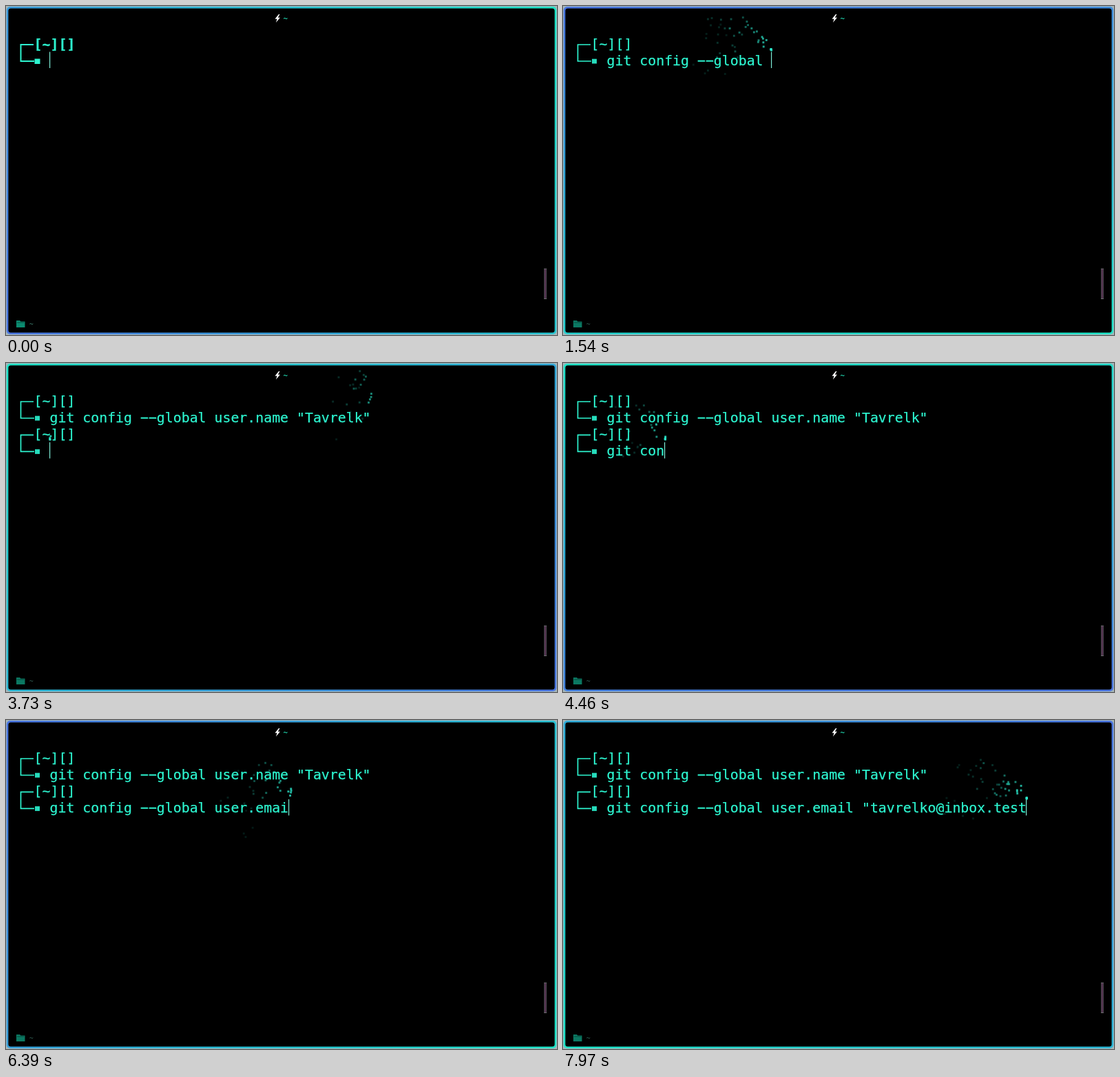
An HTML page with a canvas that plays this animation: 800x477 px, repeating every 8 s.

```html
<!DOCTYPE html>
<html lang="en">
<head>
<meta charset="utf-8">
<title>Terminal</title>
<style>
  html, body { margin: 0; width: 100%; height: 100%; overflow: hidden; background: #000; }
  canvas { display: block; width: 800px; height: 477px; }
</style>
</head>
<body>
<canvas id="stage" width="800" height="477"></canvas>
<script>
const ctx = document.getElementById("stage").getContext("2d");
const W = 800, H = 477, LOOP = 8000;
const TEAL = "#2df5d0";
const MONO = '"DejaVu Sans Mono", monospace';
const CELL = 11.95, ROW = 24.2, LEFT = 63.5, TOP = 61.5;
const SCRIPT = 'git config --global user.name "Tavrelk"\n' +
               'git config --global user.email "tavrelko@inbox.test';

// Typing rhythm: [time in ms, keys pressed]
const RHYTHM = [[150, 0], [1540, 20.4], [2280, 31], [2720, 32], [2945, 33],
                [4460, 47.3], [5660, 60.4], [7110, 79.2], [7970, 91.1], [8000, 91.4]];

// Linear interpolation along RHYTHM; from/to choose the direction.
function follow(value, from, to) {
  if (value <= RHYTHM[0][from]) return RHYTHM[0][to];
  const i = RHYTHM.findIndex(p => p[from] >= value);
  const a = RHYTHM[i - 1], b = RHYTHM[i];
  return a[to] + (b[to] - a[to]) * (value - a[from]) / (b[from] - a[from]);
}
const keysAt = time => Math.floor(follow(time, 0, 1) + 1e-6);
const timeOf = key => follow(key, 1, 0);

function random(seed) {
  const v = Math.sin(seed * 127.1 + 11.7) * 43758.5453;
  return v - Math.floor(v);
}

function rect(color, x, y, w, h) {
  ctx.fillStyle = color;
  ctx.fillRect(x, y, w, h);
}

function shape(color, points) {
  ctx.fillStyle = color;
  ctx.beginPath();
  points.forEach(([x, y]) => ctx.lineTo(x, y));
  ctx.fill();
}

function label(text, x, y, size, color, weight = "normal") {
  ctx.font = `${weight} ${size}px ${MONO}`;
  ctx.fillStyle = color;
  ctx.fillText(text, x, y);
}

// Terminal text sits on a fixed cell grid; hyphens are as wide as a minus sign.
function cells(text, x, y, weight) {
  ctx.strokeStyle = TEAL;
  ctx.lineWidth = 0.25;
  [...text.replaceAll("-", "\u2212")].forEach((c, i) => {
    label(c, x + i * CELL, y, 19.85, TEAL, weight);
    ctx.strokeText(c, x + i * CELL, y);
  });
}

function cursorAfter(key) {
  const lines = SCRIPT.slice(0, key).split("\n");
  const row = lines.length - 1;
  return { x: LEFT + lines[row].length * CELL, y: 66.5 + row * 2 * ROW };
}

function drawBorder(time) {
  const angle = (157 + time * 360 / 5600) * Math.PI / 180;
  // Direction is measured in the unit box, so the gradient follows the window's shape.
  const c = Math.cos(angle), s = Math.sin(angle);
  const reach = (Math.abs(c) + Math.abs(s)) / 2;
  const k = reach / ((c / W) ** 2 + (s / H) ** 2);
  const dx = k * c / W, dy = k * s / H;
  const paint = ctx.createLinearGradient(W / 2 + dx, H / 2 + dy, W / 2 - dx, H / 2 - dy);
  paint.addColorStop(0, "#4a74e2");
  paint.addColorStop(0.5, "#2cb2d8");
  paint.addColorStop(1, "#1ee6c8");

  rect("#a4b6ba", 0, 0, W, H);
  ctx.fillStyle = paint;
  ctx.beginPath();
  ctx.roundRect(0.9, 1, W - 1.8, H - 2, 5);
  ctx.fill();
  ctx.fillStyle = "#000";
  ctx.beginPath();
  ctx.roundRect(3.4, 3.5, W - 6.8, H - 7, 3.5);
  ctx.fill();
}

function drawPrompt(row, fresh) {
  const y = 56 + row * ROW;
  ctx.strokeStyle = TEAL;
  ctx.lineWidth = fresh ? 2 : 1.7;
  ctx.beginPath();
  ctx.moveTo(40, y);
  ctx.lineTo(21.5, y);
  ctx.lineTo(21.5, y + 24);
  ctx.lineTo(41, y + 24);
  ctx.stroke();
  if (fresh) rect(TEAL, 41.5, y + 20.5, 8, 7.5);
  else rect("#26dcbc", 42, y + 20.7, 7, 6.8);
  cells("[~][]", LEFT - 2 * CELL + 1, TOP + 0.5 + row * ROW, fresh ? "bold" : "normal");
}

function drawTerminal(keys) {
  SCRIPT.slice(0, keys).split("\n").forEach((line, i) => {
    drawPrompt(i * 2, keys === 0);
    cells(line, LEFT, TOP + (i * 2 + 1) * ROW);
  });
  const cursor = cursorAfter(keys);
  rect("#7decd5", Math.floor(cursor.x), cursor.y, 1.2, 23.5);
}

function drawSparks(time, keys) {
  for (let key = Math.max(1, keys - 14); key <= keys; key++) {
    const steps = (time - timeOf(key)) * 0.09;
    const alpha = 0.96 ** steps;
    if (alpha < 0.1) continue;
    const origin = cursorAfter(key);
    const count = 4 + Math.floor(random(key) * 3);
    ctx.globalAlpha = alpha;
    for (let i = 0; i < count; i++) {
      const seed = key * 17 + i * 2.3;
      const vx = random(seed) * 1.2 - 0.6;
      const vy = -1 - random(seed + 0.7) * 2;
      rect("#2ce8cc", origin.x + vx * steps - 1,
           origin.y + vy * steps + 0.0375 * steps * steps - 1.5, 2.9, 2.9);
    }
  }
  ctx.globalAlpha = 1;
}

function drawChrome(fresh) {
  shape("#fff", [[396, 12], [390.5, 18.7], [393.6, 18.7], [392, 24], [398, 16.7], [394.8, 16.7], [397.5, 12]]);
  label("~", 402.6, 22, 11, "#20cfa9", "bold");

  const folder = fresh ? "#0b8b70" : "#0b7862";
  shape(folder, [[15, 456], [20, 456], [21.5, 457.5], [27.5, 457.5], [27.5, 466], [15, 466]]);
  rect("#043b31", 16, 458.6, 10.5, 0.7);
  label("~", 33.8, 465, 10, fresh ? "#3c796b" : "#2f5c52");

  rect("#46434b", 781, 381, 4, 44);
  for (let y = 382; y < 424; y += 2) rect("#5c2450", 782, y, 2, 1.2);
  rect("#6c686e", 781, 380.6, 4, 1);
  rect("#6c686e", 781, 424, 4, 1);
}

function draw(now) {
  const time = now % LOOP;
  const keys = keysAt(time);
  ctx.clearRect(0, 0, W, H);
  drawBorder(time);
  drawChrome(keys === 0);
  drawTerminal(keys);
  drawSparks(time, keys);
}

let start;
function tick(now) {
  start ??= now;
  draw(now - start);
  requestAnimationFrame(tick);
}
requestAnimationFrame(tick);
</script>
</body>
</html>
```
